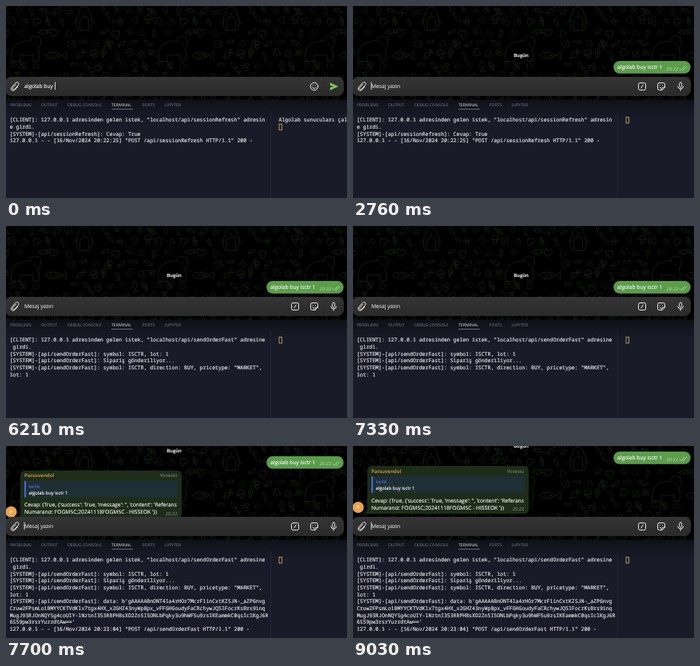
Recreate the animation shown at these times as an HTML page. Size 427x241 px, loop 9060 ms.

```html
<!DOCTYPE html>
<html lang="tr">
<head>
<meta charset="utf-8">
<title>Chat command</title>
<style>
html, body { margin: 0; width: 100%; height: 100%; overflow: hidden; background: #000; }
svg { display: block; width: 100vw; height: 100vh; }
text { font: 6.7px "Open Sans", sans-serif; fill: #fff; stroke: #fff; stroke-width: .12; white-space: pre; text-rendering: geometricPrecision; }
.term text { font: 6.5px "Noto Sans Mono", monospace; fill: #d6d7da; stroke: #d6d7da; stroke-width: .22; }
.tabs text { font-size: 5.2px; fill: #7d8190; stroke: none; }
.tabs .active { fill: #e4e5ea; }
.line { fill: none; stroke: #e8e8e8; stroke-width: 1; stroke-linecap: round; stroke-linejoin: round; }
.doodles { fill: none; stroke: #1f2a1a; stroke-width: .65; stroke-linecap: round; stroke-linejoin: round; }
.small { font-size: 5.8px; }
.tint { stroke: none; }
</style>
</head>
<body>
<svg viewBox="0 0 427 241" preserveAspectRatio="none">
  <defs>
    <clipPath id="chatClip"><rect width="427" height="101"/></clipPath>
    <linearGradient id="bar" x2="0" y2="1">
      <stop stop-color="#353535"/><stop offset="1" stop-color="#2a2a2a"/>
    </linearGradient>
    <linearGradient id="panel" x2="0" y2="1">
      <stop stop-color="#0f1119"/><stop offset=".2" stop-color="#191b29"/>
    </linearGradient>
  </defs>
  <rect width="427" height="241"/>
  <g class="doodles" id="doodles"></g>

  <g clip-path="url(#chatClip)">
    <g id="sent">
      <text x="210.5" y="64.2" text-anchor="middle" style="font-size:6px;font-weight:600">Bugün</text>
      <g id="sentBubble">
        <rect x="326.200" y="69" width="96.500" height="15.700" rx="7.600" fill="#5c9c4d"/>
        <text x="331" y="79.300">algolab buy isctr 1</text>
        <text class="small tint" x="392.500" y="80.500" style="fill:#b9dfaa">20:22</text>
        <path class="line" d="M409 78.500l2 2 4-4.500M413 80.300l.4.4 4.200-4.700" style="stroke:#b9dfaa;stroke-width:.8"/>
      </g>
    </g>
    <g id="reply">
      <circle cx="6.500" cy="77" r="7" fill="#e9a555"/>
      <text class="small" x="6.500" y="79" text-anchor="middle">P</text>
      <path d="M24 25H214Q220 25 220 31V79Q220 85 214 85H15Q18 83 18 79V31Q18 25 24 25Z" fill="#1d2d19"/>
      <text class="tint" x="23" y="33.500" style="fill:#e5a457;font-size:6.200px;font-weight:600">Parsuvendol</text>
      <text class="tint" x="214.500" y="33.500" text-anchor="end" style="fill:#8f9c8b;font-size:6px">Yönetici</text>
      <rect x="23" y="38" width="192" height="21" rx="2" fill="#202f35"/>
      <rect x="23" y="38" width="2" height="21" rx="1" fill="#4668d8"/>
      <text class="tint" x="28.500" y="46.800" style="fill:#4c70e6;font-size:5.800px;font-weight:600">torlit</text>
      <text x="28.500" y="55.300" class="small">algolab buy isctr 1</text>
      <text x="23" y="70.500">Cevap: (True, {'success': True, 'message': '', 'content': 'Referans</text>
      <text x="23" y="79.500">Numaranız: FOGM5C;20241118FOGM5C - HISSEOK '})</text>
      <text x="214.500" y="81" text-anchor="end" class="small tint" style="fill:#93a08d">20:22</text>
    </g>
  </g>

  <rect x="-1" y="89" width="424" height="24" rx="8" fill="url(#bar)"/>
  <path class="line" d="M12.300 98.300l-3.700 4.200q-1 1.300.2 2.200 1 .7 2-.3l4.500-5q1.500-1.900-.1-3.300-1.700-1.300-3.300.4l-4.600 5.200q-2 2.500.1 4.100 1.900 1.300 3.800-.6l3.400-3.800"/>
  <text id="input" x="23" y="103.300"></text>
  <rect id="caret" y="95.500" width=".8" height="9.500" fill="#fff"/>
  <g id="typingIcons">
    <circle class="line" cx="386" cy="101" r="4.800"/>
    <path class="line" d="M383.700 102.500q2.300 2.500 4.600 0M384.300 99.500v.1M387.700 99.500v.1"/>
    <path d="M405.300 96L416.300 101 405.300 106 406.300 102 411 101 406.300 100Z" fill="#81c75f"/>
  </g>
  <g id="idleIcons" class="line">
    <rect x="357.500" y="96.500" width="9" height="9" rx="2"/>
    <path d="M363.300 99l-2.600 4"/>
    <path d="M383.500 96.500h5q2 0 2 2v3.500l-3.500 3.500h-3.500q-2 0-2-2v-5q0-2 2-2zM387 105.500v-1.500q0-2 2-2h1.500M384.300 99.500v.1M387.500 99.500v.1M383.900 102.300q1 1.200 2.200.9"/>
    <rect x="408.700" y="96" width="3" height="6" rx="1.500"/>
    <path d="M406.700 101q.4 3 3.500 3t3.500-3M410.200 104v2"/>
  </g>

  <rect y="117.500" width="427" height="123.500" fill="url(#panel)"/>
  <g class="tabs">
    <text x="5" y="126">PROBLEMS</text>
    <text x="44" y="126">OUTPUT</text>
    <text x="77" y="126">DEBUG CONSOLE</text>
    <text x="132" y="126" class="active">TERMINAL</text>
    <text x="170.500" y="126">PORTS</text>
    <text x="199" y="126">JUPYTER</text>
    <rect x="132" y="129" width="27" height=".8" fill="#7c7f8c"/>
  </g>
  <rect x="331" y="132" width="1" height="109" fill="#222534"/>
  <g class="term">
    <g id="before"></g>
    <g id="order"></g>
    <g id="result"></g>
    <text id="status" x="341.500" y="145.300">Algolab sunucuları çalışıyor</text>
    <rect id="termCursor" x="342" width="3.400" height="7.600" fill="none" stroke="#c9b75f" stroke-width=".8"/>
  </g>
</svg>

<script>
const LOOP = 9060, SEND = 1850, ORDER = 5400, RESULT = 7400, REPLY = 7450;
const $ = id => document.getElementById(id);
const SVG = "http://www.w3.org/2000/svg";

function add(parent, tag, attrs, content = "") {
  const el = document.createElementNS(SVG, tag);
  for (const key in attrs) el.setAttribute(key, attrs[key]);
  el.textContent = content;
  parent.append(el);
}

function printLines(id, firstRow, lines) {
  lines.forEach((line, i) => add($(id), "text", { x: 4.7, y: 145.3 + (firstRow + i) * 8.65 }, line));
}

const system = "[SYSTEM]-[api/sendOrderFast]: ";
printLines("before", 0, [
  '[CLIENT]: 127.0.0.1 adresinden gelen istek, "localhost/api/sessionRefresh" adresin',
  "e girdi.",
  "[SYSTEM]-[api/sessionRefresh]: Cevap: True",
  '127.0.0.1 - - [16/Nov/2024 20:22:25] "POST /api/sessionRefresh HTTP/1.1" 200 -'
]);
printLines("order", 0, [
  '[CLIENT]: 127.0.0.1 adresinden gelen istek, "localhost/api/sendOrderFast" adresine',
  " girdi.",
  system + "symbol: ISCTR, lot: 1",
  system + "Sipariş gönderiliyor...",
  system + 'symbol: ISCTR, direction: BUY, pricetype: "MARKET",',
  "lot: 1"
]);
printLines("result", 6, [
  system + "data: b'gAAAAABnONT4la4rHOr7McrF1inCxtKZSJN-_aZP6nvg",
  "Cruw2FPsmLo1BMYYCKTVdKlx7tgx4HX_x2GHZ43nyWp8px_vFFGHGoudyFaCRchywJQ5lFocrKsBrs9inq",
  "MugJ93RJOnNQYSg4coUIY-lNztnI353RBPHBsXD2Zn5I5ONLbPqky3u9hWF5u9zsIKEammkC0qsIclKgJ6R",
  "6S59pw3rsrYuzrdtAw=='",
  '127.0.0.1 - - [16/Nov/2024 20:23:04] "POST /api/sendOrderFast HTTP/1.1" 200 -'
]);

// Wallpaper tile: a few animals with small doodles scattered between them
const TILE = 184;
const bear = "M-18 17Q-21-1-8-6Q0-9 6-8Q4-13 8-13Q10-16 14-13Q18-14 18-10Q20-3 15 0Q18 8 16 17H9V9Q0 11-7 9V17ZM9-7v.1M14-7v.1M10-4h3";
const penguin = "M-8 13Q-13 0-7-7Q-7-16 0-16T7-7Q13 0 8 13ZM-5 12Q-8-3 0-4T5 12M-3-11v.1M3-11v.1M-1-8L0-6 1-8M-8 0l-6 5M8 0l6 5";
const fish = "M-13 0Q-4-9 8 0L14-5V5L8 0Q-4 9-13 0M-6-4Q-3 0-6 4M-2-3l6 5M-2 3l6-5";
const animals = [[98, 17, penguin], [25, 52, bear], [62, 62, fish]];
const doodles = [
  "M-5 5Q-4-2 1-4L4-1Q2 4-5 5ZM2-3l1-4M3-2l4-2M-2 1l2 1",
  "M0-1Q-3-6 0-6T0-1Q5-4 5-1T0 1Q3 5 0 5T0 1Q-5 4-5 0T0-1",
  "M-5 4Q-5-4 5-5Q5 4-5 4ZM-5 4L3-3M-1 0v-3M-2 1h4",
  "M-5 0Q-4-5 0-5T5 0ZM-2 0v5h4V0M-2-3v.1M2-2v.1",
  "M-4 3Q0-2 4 3Q2 6 0 4Q-2 6-4 3M-4-1v-2M-1-3v-2M2-3v-2M5-1v-2",
  "M-6 0Q-1-6 4 0L7-3V3L4 0Q-1 6-6 0M-3-1v.1",
  "M0 5Q-8-1-4-4Q-1-5 0-2Q1-5 4-4Q8-1 0 5"
];
let seed = 7;
const random = () => (seed = seed * 16807 % 2147483647) / 2147483647;

function drawTiled(x, y, d, turn = 0, scale = 1) {
  for (let left = 0; left < 427; left += TILE) {
    add($("doodles"), "path", { d, transform: `translate(${left + x} ${y}) rotate(${turn}) scale(${scale})` });
  }
}

for (const animal of animals) drawTiled(...animal);
for (let row = 0; row < 9; row++) {
  for (let col = 0; col < 12; col++) {
    const x = col * TILE / 12 + (row % 2) * 7 + random() * 5 - 2;
    const y = row * 14 + 4 + random() * 5 - 2;
    const d = doodles[Math.floor(random() * doodles.length)];
    const turn = random() * 360, scale = .7 + random() * .35;
    if (animals.every(a => Math.hypot(a[0] - x, a[1] - y) > 20)) drawTiled(x, y, d, turn, scale);
  }
}

const typed = "isctr 1", keyTimes = [250, 570, 920, 1110, 1280, 1450, 1630];
const show = (id, on) => $(id).style.display = on ? "" : "none";
const shift = (id, y) => $(id).setAttribute("transform", `translate(0 ${y})`);
const easeOut = (t, start, duration) => 1 - (1 - Math.min(1, Math.max(0, (t - start) / duration))) ** 3;

function caretVisible(t) {
  if (t < 3880) return true;
  return t >= 4360 && (t - 4360) % 1055 < 545;
}

function render(t) {
  const sent = t >= SEND;
  const draft = "algolab buy " + typed.slice(0, keyTimes.filter(k => t >= k).length);
  const input = $("input"), value = sent ? "Mesaj yazın" : draft;
  if (input.textContent !== value) input.textContent = value;
  input.style.fill = input.style.stroke = sent ? "#d8d8d8" : "#fff";
  $("caret").setAttribute("x", sent ? 22.6 : 23.3 + input.getComputedTextLength());
  show("caret", caretVisible(t));
  show("typingIcons", !sent);
  show("idleIcons", sent);

  const scroll = 62 * easeOut(t, REPLY, 460);
  show("sent", sent);
  shift("sent", -scroll);
  shift("sentBubble", 24 * (1 - easeOut(t, SEND, 300)));
  show("reply", t >= REPLY);
  shift("reply", 62 - scroll);

  show("before", t < ORDER);
  show("order", t >= ORDER);
  show("result", t >= RESULT);
  const cleared = t >= 2000;
  show("status", !cleared);
  $("termCursor").setAttribute("y", cleared ? 139.4 : 148.1);
}

function frame(now) {
  render(now % LOOP);
  requestAnimationFrame(frame);
}
render(0);
requestAnimationFrame(frame);
</script>
</body>
</html>
```
